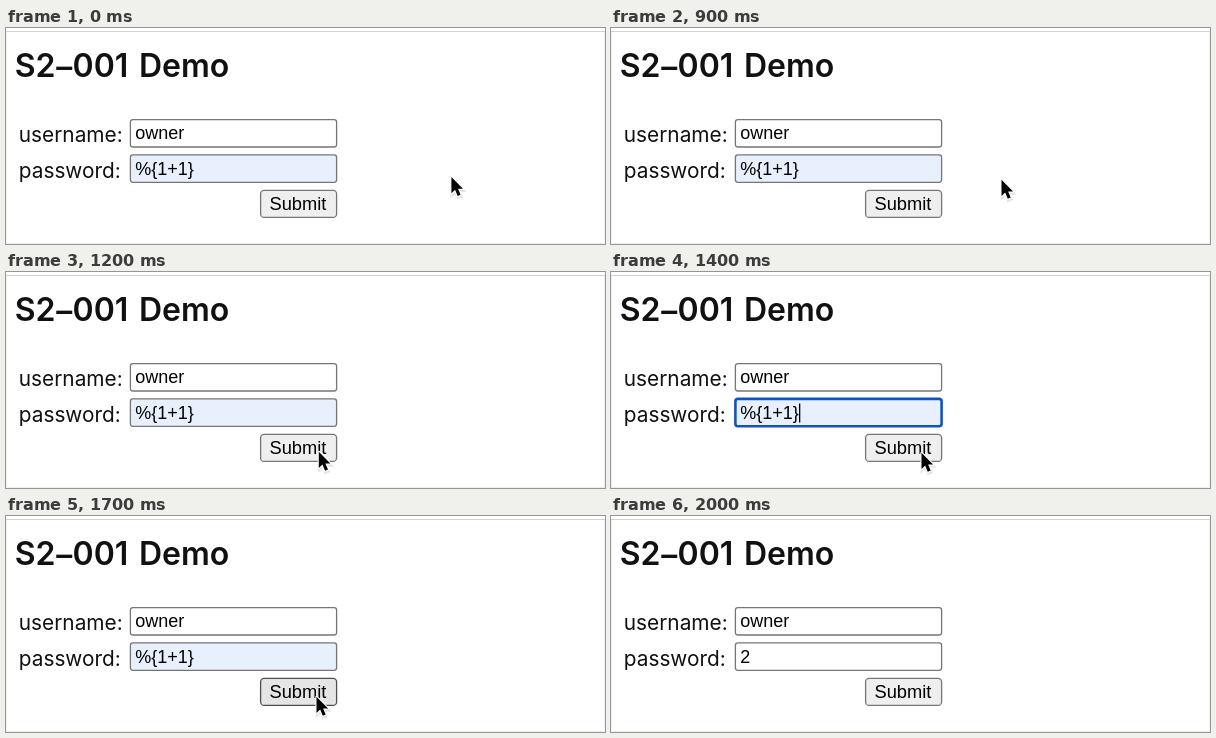
Animation of 599x216 px, one loop 2.2 s. Source, as an HTML page:

```html
<!DOCTYPE html>
<html lang="en">
<head>
<meta charset="utf-8">
<title>Login form demo</title>
<style>
  html, body { margin: 0; width: 100%; height: 100%; overflow: hidden; background: #fff; }
  svg { display: block; width: 599px; height: 216px; }
  text { fill: #111; white-space: pre; }
  .page { font-family: Inter, "Noto Sans", sans-serif; font-size: 20.8px; }
  .title { font-size: 32px; font-weight: 600; }
  .field { font-family: "Liberation Sans", Arial, sans-serif; font-size: 18px; fill: #000; }
  .box { fill: #fff; stroke: #767676; stroke-width: 1.3; }
</style>
</head>
<body>
<svg viewBox="0 0 599 216">
  <defs>
    <path id="arrow" d="M0 0V17.6L4 13.9L6.8 20.6L10 19.2L7.2 12.7H12.6Z"/>
  </defs>
  <rect width="599" height="216" fill="#fff"/>
  <path d="M.5 4V215.5H598.5V4" fill="none" stroke="#efefef"/>
  <rect y="3" width="599" height="1" fill="#d2d0d1"/>

  <text class="page title" x="8.8" y="49.2">S2<tspan dx=".6" dy="2.4">–</tspan><tspan dx=".4" dy="-2.4">001</tspan><tspan x="132.9">Demo</tspan></text>
  <text class="page" x="12.8" y="114">username:</text>
  <text class="page" x="12.8" y="149.6">password:</text>

  <rect class="box" x="124.4" y="91.6" width="206.2" height="27.4" rx="2.5"/>
  <text class="field" x="129.2" y="111">owner</text>

  <rect class="box" id="pass" x="124.4" y="126.9" width="206.2" height="27.4" rx="2.5"/>
  <text class="field" id="value" x="129.2" y="147"></text>
  <rect id="caret" x="188" y="131.5" width="1.3" height="19" fill="#000"/>

  <rect class="box" id="button" x="254.6" y="162.4" width="76" height="27" rx="3.5"/>
  <text class="field" x="263.5" y="182.3" style="font-size:18.3px">Submit</text>

  <g id="cursor">
    <g transform="scale(.92)">
      <use href="#arrow" x=".5" y="2" stroke="#000" stroke-width="3" opacity=".1"/>
      <use href="#arrow" stroke="#fff" stroke-width="2.4" stroke-linejoin="round" paint-order="stroke"/>
    </g>
  </g>
</svg>
<script>
  const LOOP = 2200, STEP = 100;
  const $ = id => document.getElementById(id);

  // time, x, y of the pointer tip
  const path = [
    [0, 445.4, 149], [100, 434, 145], [200, 412.5, 140], [300, 403, 139.3],
    [900, 390.5, 151.8], [1000, 365.5, 161], [1100, 333.5, 173],
    [1200, 312.8, 179.8], [1300, 311, 180.6], [1400, 310.5, 180.8]
  ];

  function set(id, styles) {
    for (const key in styles) $(id).style.setProperty(key, styles[key]);
  }

  function draw(ms) {
    const t = Math.floor((ms % LOOP) / STEP) * STEP;
    const [, x, y] = path.filter(p => p[0] <= t).pop();
    const focus = t >= 1400 && t < 1600;
    const press = t === 1600;
    const hover = t >= 1700 && t < 2000;
    const done = t >= 2000;

    $("cursor").setAttribute("transform", `translate(${x} ${y})`);
    set("cursor", { display: done ? "none" : "inline" });
    $("value").textContent = done ? "2" : "%{1+1}";
    set("caret", { display: focus ? "inline" : "none" });
    set("pass", {
      fill: done ? "#fff" : "#e8f0fe",
      stroke: focus ? "#1453bd" : "#767676",
      "stroke-width": focus ? 2.6 : 1.3
    });
    set("button", {
      fill: press ? "#f5f5f5" : hover ? "#e5e5e5" : "#efefef",
      stroke: press ? "#8d8d8d" : hover ? "#4f4f4f" : "#767676"
    });
  }

  const start = performance.now();
  function tick() {
    draw(performance.now() - start);
    requestAnimationFrame(tick);
  }
  tick();
</script>
</body>
</html>
```
